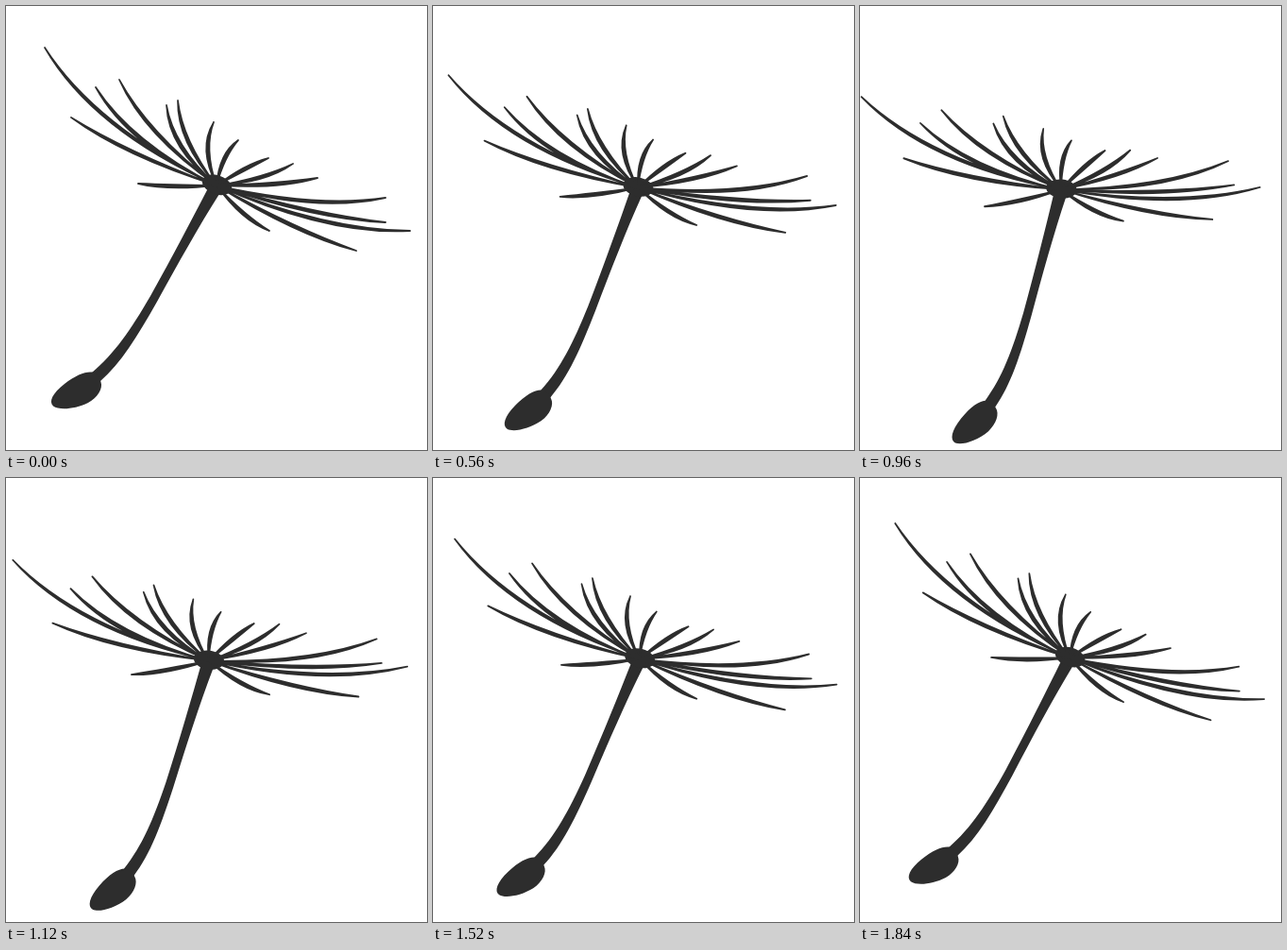
Animation of 446x470 px, one loop 1920 ms. Source, as an HTML page:

```html
<!DOCTYPE html>
<html lang="en">
<head>
<meta charset="utf-8">
<title>Swaying dandelion seed</title>
<style>
  html, body { margin: 0; width: 100%; height: 100%; overflow: hidden; background: #fff; }
  svg { display: block; width: 446px; height: 470px; }
</style>
</head>
<body>
<svg viewBox="0 0 446 470" fill="#2d2d2d">
  <g id="plant">
    <path d="M214 193C198 224 177 264 153 307C132 343 115 368 91 388L99.500 397.500C122 378 139 350 160 313C182 273 205 232 226 199Z"/>
    <path d="M93 388C86 386 75 390 62 400C49 410 45 419 50 423.500C56 428 73 427 87 420C97 414.500 103 405 100.500 398Q99 391 93 388Z"/>
    <ellipse cx="223.500" cy="189.300" rx="16.200" ry="10" transform="rotate(20 223.500 189.300)"/>
    <path id="hairs"/>
  </g>
</svg>
<script>
  const LOOP = 1920, STEP = 80, SWING = 13.83, PIVOT = '236 233';
  const ROOT = { x: 223, y: 190 };

  // Hair tips; everything else about a hair follows from its tip.
  const tips = [
    [41, 44], [69, 118], [95, 86], [120, 78], [170, 105], [182, 100],
    [220, 123], [140, 188], [246, 142], [278, 161], [304, 167], [330, 182],
    [402, 203], [402, 229], [428, 238], [371, 259], [279, 238]
  ];

  // Bend as a share of length: strongest for upright hairs, mirrored on the
  // right-hand fan, and alternating a little between neighbours.
  function bendOf(degrees, index) {
    const ripple = index % 2 ? -0.025 : 0.025;
    if (degrees > 338 || degrees < 90) return -0.08 - ripple;
    const lean = Math.min(90, Math.abs(degrees - 262) * 1.2);
    return 0.07 + 0.13 * Math.cos(lean * Math.PI / 180) ** 2 + ripple;
  }

  // A curved sliver from the root to a rounded tip.
  function hair([x, y], index) {
    const dx = x - ROOT.x, dy = y - ROOT.y, length = Math.hypot(dx, dy);
    const degrees = (Math.atan2(dy, dx) * 180 / Math.PI + 360) % 360;
    const bend = bendOf(degrees, index) * length;
    const width = 4.4 - length / 250;
    const at = (along, across) => {
      const px = ROOT.x + dx * along + dy / length * across;
      const py = ROOT.y + dy * along - dx / length * across;
      return `${px.toFixed(2)} ${py.toFixed(2)}`;
    };
    return `M${at(0, 0.7)}Q${at(0.6, bend + width)} ${at(1, 0.9)}` +
           `A.9 .9 0 0 1 ${at(1, -0.9)}Q${at(0.6, bend - width)} ${at(0, -0.7)}Z`;
  }

  document.getElementById('hairs').setAttribute('d', tips.map(hair).join(''));
  const plant = document.getElementById('plant');
  const start = performance.now();

  function draw(now) {
    const elapsed = Math.max(0, now - start) % LOOP;
    const phase = Math.floor(elapsed / STEP) * STEP / LOOP;
    const angle = -SWING * (1 - Math.abs(1 - 2 * phase));
    plant.setAttribute('transform', `rotate(${angle} ${PIVOT})`);
    requestAnimationFrame(draw);
  }
  draw(start);
</script>
</body>
</html>
```
